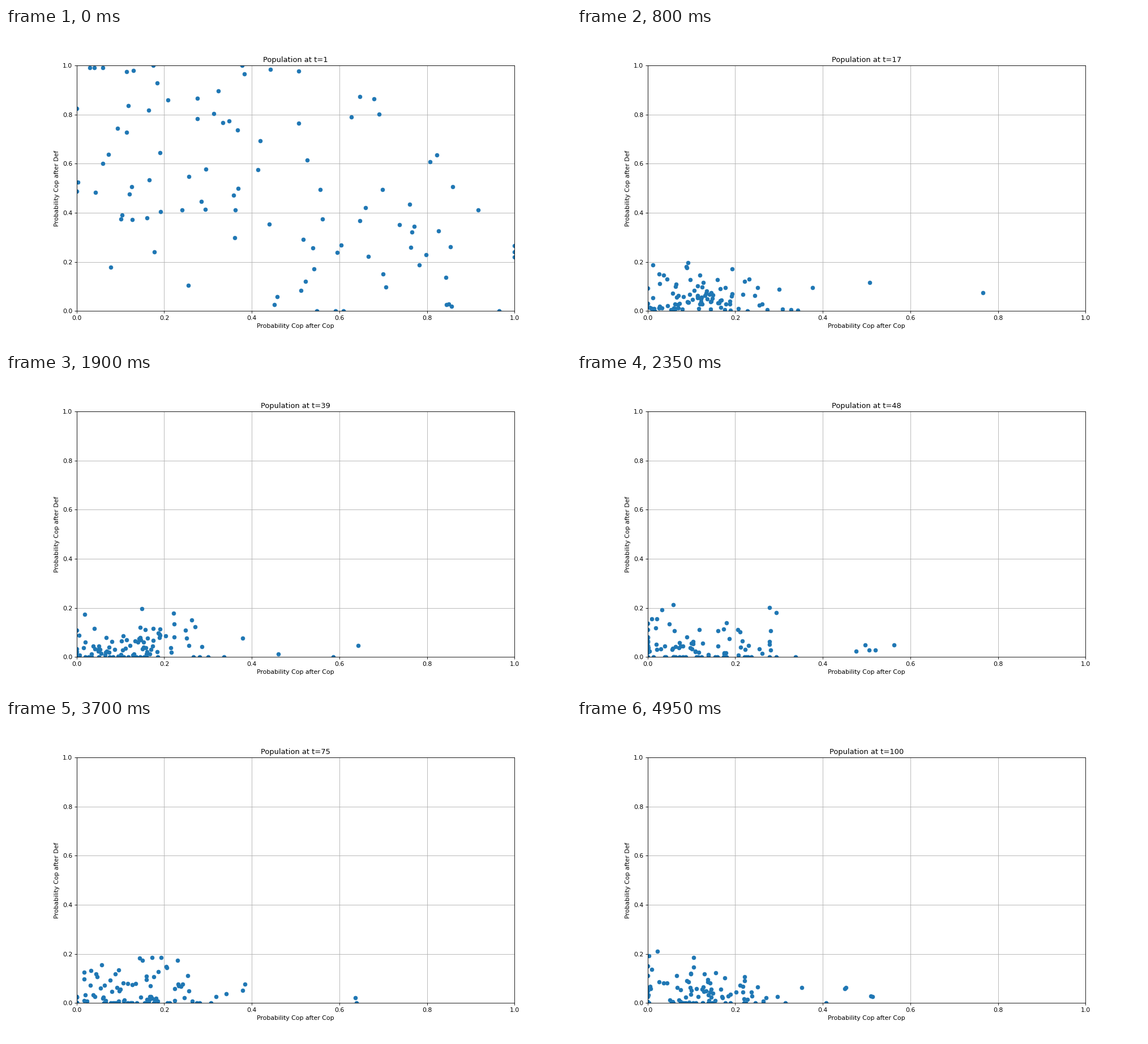
A matplotlib script for the animation above (5050 ms loop, 998 by 561 pixels).

```python
import numpy as np
import matplotlib.pyplot as plt
from matplotlib.animation import FuncAnimation

DPI = 78
WIDTH, HEIGHT = 998, 561
GENERATIONS = 100
SIZE = 100
FAR, HIGH = 5, 7

# Furthest x reached in each run of eleven generations.
REACH = [0.95, 0.90, 0.85, 0.645, 0.617, 0.58, 0.757, 0.718, 0.641]


def spread(rng):
    """Agents over the whole square, thinned away from the falling diagonal."""
    agents = rng.uniform(-0.04, 1.03, (SIZE * 8, 2))
    offset = agents.sum(axis=1) - 0.85
    keep = rng.random(len(agents)) < np.exp(-(offset / 0.5) ** 2)
    return agents[keep][:SIZE]


def settled(rng, reach):
    """A crowd near the origin with a few agents far out along each axis."""
    far_x = 0.25 + (reach - 0.25) * rng.random(FAR) ** 1.5
    far = np.column_stack([far_x, rng.normal(0.03, 0.04, FAR)])
    high = rng.uniform((0, 0.1), (0.3, 0.22), (HIGH, 2))
    crowd = rng.normal((0.115, 0.03), (0.095, 0.048), (SIZE - FAR - HIGH, 2))
    return np.clip(np.vstack([far, high, crowd]), 0, 1)


def population(t):
    rng = np.random.default_rng(t)
    reach = REACH[max(t - 2, 0) // 11]
    start, end = spread(rng), settled(rng, reach)
    # The early spread dies out as defectors take over.
    fade = np.exp(-(t - 1) / 4)
    return np.clip(end + fade * (start - end), 0, 1)


fig, ax = plt.subplots(figsize=(WIDTH / DPI, HEIGHT / DPI), dpi=DPI)
fig.subplots_adjust(bottom=1 - 499.1 / HEIGHT, top=1 - 66.2 / HEIGHT)
dots, = ax.plot([], [], "o", color="tab:blue")
ax.set(xlim=(0, 1), ylim=(0, 1),
       xlabel="Probability Cop after Cop", ylabel="Probability Cop after Def")
ax.grid(True)
title = ax.set_title("Population at t=1")


def update(i):
    t = min(i + 1, GENERATIONS)
    dots.set_data(*population(t).T)
    title.set_text(f"Population at t={t}")
    return dots, title


anim = FuncAnimation(fig, update, frames=GENERATIONS + 1, interval=50,
                     repeat=True, repeat_delay=0)
plt.show()
```
